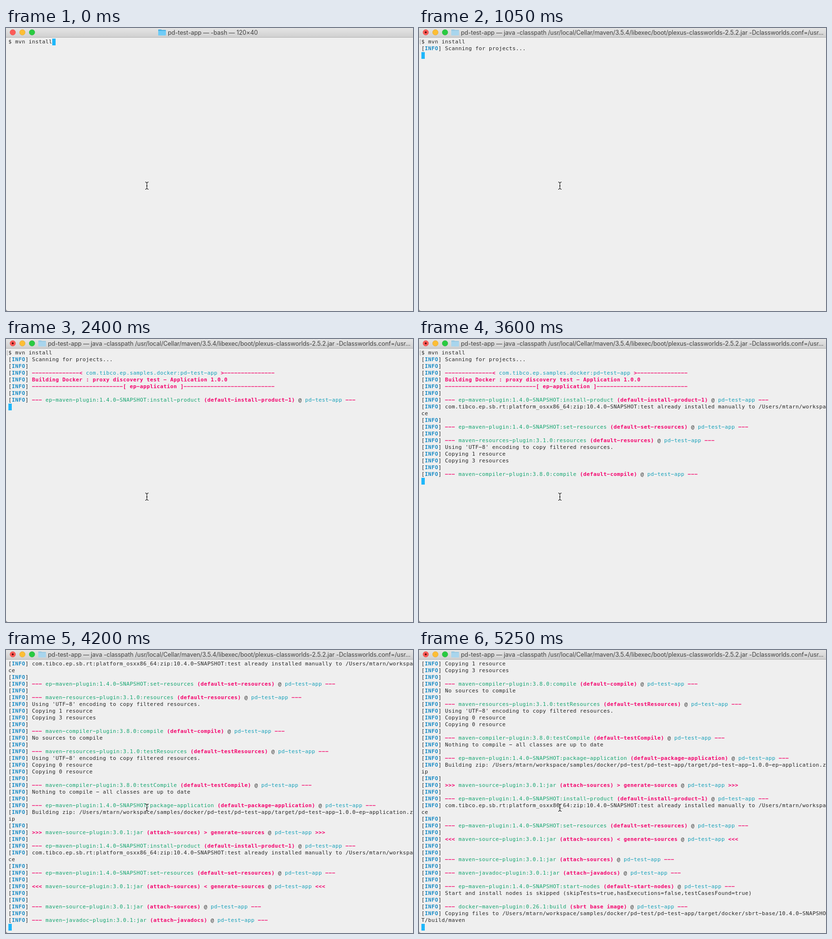
An HTML page with a canvas that plays this animation: 845x587 px, repeating every 8 s.

```html
<!DOCTYPE html>
<html lang="en">
<head>
<meta charset="utf-8">
<title>Terminal</title>
<style>
  html, body { margin: 0; width: 100%; height: 100%; overflow: hidden; background: #efefef; }
  #window { position: relative; width: 100%; height: 100%; overflow: hidden; contain: strict; }
  canvas, #log, #title { position: absolute; left: 0; top: 0; }
  #log {
    left: 5px; top: 22px; margin: 0; color: #262626; white-space: pre;
    font: 11px/14px "DejaVu Sans Mono", monospace;
    letter-spacing: calc(7px - 1ch); font-variant-ligatures: none;
  }
  #log div { height: 14px; }
  #title {
    color: #424242; white-space: pre;
    font: 12.5px/19px Inter, sans-serif; letter-spacing: -0.09px;
    font-feature-settings: "calt" 0;
  }
  b { color: #f4006c; }
  .info { color: #1a8cc6; }
  .plugin { color: #14a570; }
  .project { color: #18a1ba; }
</style>
</head>
<body>
<div id="window">
  <pre id="log"></pre>
  <canvas id="stage" width="845" height="587"></canvas>
  <div id="title"></div>
</div>
<script>
const LOOP = 8000, ROWS = 40, COLS = 120, CELL_W = 7, CELL_H = 14, LEFT = 5, TOP = 22;
const APP = 'pd-test-app';
const WORKSPACE = '/Users/mtarn/workspace';
const TARGET = `${WORKSPACE}/samples/docker/pd-test/${APP}/target`;

const log = document.getElementById('log');
const title = document.getElementById('title');
const ctx = document.getElementById('stage').getContext('2d');

// Log text; the terminal face has hyphens as long as a minus sign
const esc = s => s.replace(/</g, '&lt;').replace(/>/g, '&gt;').replace(/-/g, '\u2212');
const bold = s => `<b>${esc(s)}</b>`;
const tint = (name, s) => `<span class="${name}">${esc(s)}</span>`;
const info = html => `[<b class="info">INFO</b>] ${html}`;
const lines = ['$ mvn install'];

const blank = () => lines.push(info(''));
const rich = html => lines.push(info(html));
function say(text) {
  const room = COLS - 7;
  lines.push(info(esc(text.slice(0, room))));
  if (text.length > room) lines.push(esc(text.slice(room)));
}
function goal(plugin, phase, mark = '---') {
  rich(`${bold(mark)} ${tint('plugin', plugin)} ${bold(phase)} @ ${tint('project', APP)} ${bold(mark)}`);
}
const ep = (name, phase) => goal('ep-maven-plugin:1.4.0-SNAPSHOT:' + name, `(default-${phase})`);
const resources = name => goal('maven-resources-plugin:3.1.0:' + name, `(default-${name})`);
const compiler = name => goal('maven-compiler-plugin:3.8.0:' + name, `(default-${name})`);
const source = (phase, mark) => goal('maven-source-plugin:3.0.1:jar', '(attach-sources)' + phase, mark);
const encoding = () => say("Using 'UTF-8' encoding to copy filtered resources.");

function installProduct() {
  ep('install-product', 'install-product-1');
  say(`com.tibco.ep.sb.rt:platform_osxx86_64:zip:10.4.0-SNAPSHOT:test already installed manually to ${WORKSPACE}`);
  blank();
  ep('set-resources', 'set-resources');
  blank();
}

say('Scanning for projects...');
blank();
rich(bold('-'.repeat(14) + '< ') + tint('project', 'com.tibco.ep.samples.docker:' + APP) + bold(' >' + '-'.repeat(15)));
rich(bold('Building Docker : proxy discovery test - Application 1.0.0'));
rich(bold('-'.repeat(27) + '[ ep-application ]' + '-'.repeat(27)));
blank();
installProduct();
resources('resources');
encoding();
say('Copying 1 resource');
say('Copying 3 resources');
blank();
compiler('compile');
say('No sources to compile');
blank();
resources('testResources');
encoding();
say('Copying 0 resource');
say('Copying 0 resource');
blank();
compiler('testCompile');
say('Nothing to compile - all classes are up to date');
blank();
ep('package-application', 'package-application');
say(`Building zip: ${TARGET}/${APP}-1.0.0-ep-application.zip`);
blank();
source(' > generate-sources', '>>>');
blank();
installProduct();
source(' < generate-sources', '<<<');
blank();
blank();
source('');
blank();
goal('maven-javadoc-plugin:3.0.1:jar', '(attach-javadocs)');
blank();
ep('start-nodes', 'start-nodes');
say('Start and install nodes is skipped (skipTests=true,hasExecutions=false,testCasesFound=true)');
blank();
goal('docker-maven-plugin:0.26.1:build', '(sbrt base image)');
say(`Copying files to ${TARGET}/docker/sbrt-base/10.4.0-SNAPSHOT/build/maven`);

// [start time, lines printed]
const steps = [
  [0, 1], [300, 1], [1050, 2], [1950, 6], [2400, 8], [3600, 19],
  [3750, 30], [3900, 32], [4200, 47], [4500, 52], [5250, 54]
];

// Window drawing
function disc(x, y, r, fill, edge) {
  ctx.beginPath();
  ctx.arc(x, y, r, 0, Math.PI * 2);
  ctx.fillStyle = fill;
  ctx.fill();
  if (edge) {
    ctx.strokeStyle = edge;
    ctx.lineWidth = 0.6;
    ctx.stroke();
  }
}

function folder(x, body, back) {
  ctx.fillStyle = back;
  ctx.beginPath();
  ctx.roundRect(x, 3, 7, 4, 1);
  ctx.roundRect(x, 4, 16, 6, 1);
  ctx.fill();
  ctx.fillStyle = body;
  ctx.beginPath();
  ctx.roundRect(x, 6, 16, 9.5, 1);
  ctx.fill();
}

function titleBar(running) {
  const shade = ctx.createLinearGradient(0, 0, 0, 19);
  shade.addColorStop(0, '#e5e5e5');
  shade.addColorStop(1, '#d0d0d0');
  ctx.fillStyle = shade;
  ctx.fillRect(0, 0, 845, 19);
  ctx.fillStyle = '#b3b3b3';
  ctx.fillRect(0, 19, 845, 1);
  disc(14, 9, 5.8, '#fc5b57', '#e2463f');
  disc(34, 9, 5.8, '#fdbe34', '#dfa023');
  disc(54, 9, 5.8, '#29cb41', '#1dac2c');
  if (running) {
    disc(14, 9, 2, '#5a0a08');
    folder(67, '#a8d5ed', '#9ccbe4');
  } else {
    folder(316, '#6fcbf6', '#48b1e3');
  }
}

function pointer() {
  const path = new Path2D('M289 319.5h1.5l2 2l2-2h1.5M292.5 321v12M289 334.5h1.5l2-2l2 2h1.5M291 327.5h3');
  for (const [width, color] of [[2.6, 'rgba(255,255,255,.8)'], [1.1, '#111']]) {
    ctx.lineWidth = width;
    ctx.strokeStyle = color;
    ctx.stroke(path);
  }
}

function render(index) {
  const count = steps[index][1], running = index > 0;
  const first = Math.max(0, count - ROWS + 1);
  log.innerHTML = lines.slice(first, count).map(s => `<div>${s}</div>`).join('');
  title.style.left = running ? '87px' : '336px';
  title.textContent = APP + (running
    ? ' — java -classpath /usr/local/Cellar/maven/3.5.4/libexec/boot/plexus-classworlds-2.5.2.jar -Dclassworlds.conf=/usr...'
    : ' — -bash — 120×40');

  ctx.clearRect(0, 0, 845, 587);
  titleBar(running);
  const col = running ? 0 : lines[0].length;
  const row = running ? count - first : 0;
  ctx.fillStyle = '#1fb7fa';
  ctx.fillRect(LEFT + col * CELL_W, TOP + row * CELL_H, CELL_W, CELL_H);
  if (running && first === 0) {
    ctx.strokeStyle = '#a6a6a6';
    ctx.lineWidth = 1;
    ctx.stroke(new Path2D('M4 24.5H2.5V33.5H4'));
  }
  // Rounded lower-left window corner
  ctx.fillStyle = '#8a8a8a';
  ctx.fill(new Path2D('M0 583Q0.5 586.5 4 587H0Z'));
  pointer();
}

const start = performance.now();
let shown = -1;
function tick() {
  const t = (performance.now() - start) % LOOP;
  const index = steps.filter(s => s[0] <= t).length - 1;
  if (index !== shown) render(shown = index);
  requestAnimationFrame(tick);
}
tick();
</script>
</body>
</html>
```
